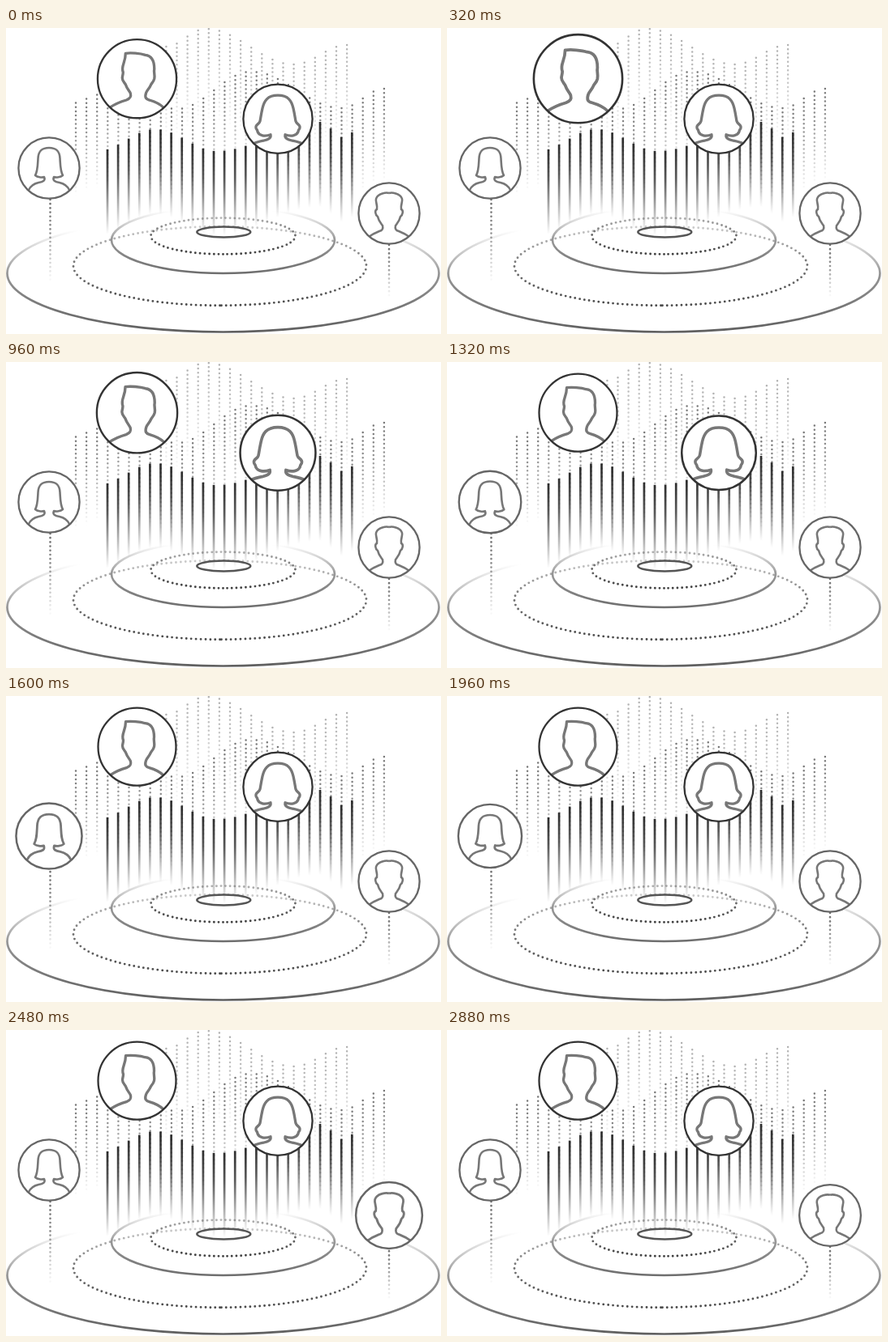
These frames come from a looping animation (536 px wide and 378 px high, 2920 ms). An HTML page with a canvas:

```html
<!DOCTYPE html>
<html lang="en">
<head>
<meta charset="utf-8">
<title>Audience stage</title>
<style>
html, body { margin: 0; width: 536px; height: 378px; overflow: hidden; background: #fff; }
canvas { display: block; }
</style>
</head>
<body>
<canvas id="stage" width="536" height="378"></canvas>
<script>
const LOOP = 2920, STEP = 13.1, DOTS = [0, 5.2];
const ctx = document.getElementById('stage').getContext('2d');

// Crests and troughs [column, y]; the columns between follow a cosine
const rows = [
  { x: 197.4, count: 18, length: 115, grey: 178, width: 2.5, dash: DOTS,
    turns: [[0, 23], [3.7, 1], [12, 45], [17, 21]] },
  { x: 86, count: 30, length: 115, grey: 120, width: 2.5, dash: DOTS,
    turns: [[-2.5, 99], [4.5, 76], [9.5, 100], [16.5, 54], [25, 99], [29, 75]] },
  { x: 125, count: 24, length: 105, grey: 45, width: 2.7,
    turns: [[-1, 152], [4.5, 125], [10.3, 152], [20, 116], [22.2, 135], [24, 120]] }
];

// Each pulse grows from start to peak and shrinks back until end
const large = { ring: '#333', ringWidth: 2.3, width: 3.3, grow: .2 };
const small = { ring: '#666', ringWidth: 2.3, width: 2.6, grow: .1 };
const people = [
  { ...large, x: 161.5, y: 62.7, r: 48, start: -30, peak: 480, end: 1060,
    path: 'M-33 35C-27 31-20 28-13 26C-8 24-7 22-8 18C-9 15-12 13-14 7C-15 5-18 3-18-1C-18-3-17-5-17-8C-20-16-14-19-14-31C-8-32 4-31 10-29C19-28 21-20 21-12C20-8 22-5 21 0C20 4 18 5 17 7C15 12 12 14 11 17C9 23 11 25 15 26C22 28 28 31 32 35' },
  { ...large, x: 335, y: 112.2, r: 42.6, mirror: true, start: 822, peak: 1130, end: 1434,
    path: 'M0-29C-13-29-17-22-19-13C-21-4-21-2-22 3C-23 7-28 7-27 11C-27 13-25 13-25 16C-23 21-16 22-9 19.5C-8 25-14 26-18 27C-23 28-27 29-31 31' },
  { ...small, x: 53, y: 173, r: 37.6, mirror: true, start: 1237, peak: 1700, end: 2133,
    path: 'M0-25C-9-25-13-21-13.5-12C-14-2-14 4-17 9C-14 11.5-9 12-6 11C-4 16-8 17-13 18C-20 19.5-23 23-25 27' },
  { ...small, x: 472, y: 229, r: 37.6, mirror: true, start: 1960, peak: 2420, end: 2920,
    path: 'M0-25C-3-26-14-25-16-18C-17-14-14-11-15-5C-18-4-17 2-14 4C-13 9-11 11-8 15C-7 19-8 21-12 22C-17 24-21 26-25 29' }
];
for (const p of people) p.shape = new Path2D(p.path);

function wave(turns, i) {
  const next = turns.findIndex(([at]) => at >= i) || 1;
  const [x0, y0] = turns[next - 1], [x1, y1] = turns[next];
  return y0 + (y1 - y0) * (1 - Math.cos(Math.PI * (i - x0) / (x1 - x0))) / 2;
}

function pen(style, width, dash = []) {
  ctx.strokeStyle = style;
  ctx.lineWidth = width;
  ctx.setLineDash(dash);
  ctx.lineCap = dash.length ? 'round' : 'butt';
}

function gradient(y0, y1, grey, stops) {
  const g = ctx.createLinearGradient(0, y0, 0, y1);
  for (const [at, alpha] of stops) g.addColorStop(at, `rgba(${grey},${grey},${grey},${alpha})`);
  return g;
}

function column(x, top, { length, grey, width, dash }) {
  pen(gradient(top, top + length, grey, [[0, 1], [.35, .78], [1, 0]]), width, dash);
  ctx.beginPath();
  ctx.moveTo(x, top);
  ctx.lineTo(x, top + length);
  ctx.stroke();
}

// Starts at the bottom, so the seam of a dotted ring lies there
function ring(x, y, rx, ry, style, width, dash) {
  pen(style, width, dash);
  ctx.beginPath();
  ctx.ellipse(x, y, rx, ry, 0, Math.PI / 2, Math.PI * 2.5);
  ctx.stroke();
}

function backdrop() {
  for (const row of rows)
    for (let i = 0; i < row.count; i++) column(row.x + STEP * i, wave(row.turns, i), row);

  ring(267.5, 303, 266, 72.5, gradient(250, 376, 95, [[0, 0], [.42, .65], [1, 1]]), 2.7);
  ring(263.5, 294, 180.5, 48.8, gradient(245, 343, 75, [[0, .28], [.45, .75], [1, 1]]), 2.9, [0, 5.9]);
  ring(267.5, 262, 137.5, 41, gradient(226, 303, 110, [[0, 0], [.45, .7], [1, 1]]), 2.6);
  ring(267.5, 257, 89, 22.4, gradient(234, 280, 65, [[0, .4], [.5, .8], [1, 1]]), 2.9, [0, 5.7]);
  ring(268.3, 252, 33, 6.5, '#555', 2.6);

  const stem = { grey: 110, width: 2.7, dash: DOTS };
  column(54.5, 212, { ...stem, length: 103 });
  column(472, 268, { ...stem, length: 65 });
}

function pulse({ start, peak, end }, t) {
  const up = (t - start) / (peak - start), down = (end - t) / (end - peak);
  return Math.max(0, Math.min(up, down));
}

function portrait(p, t) {
  const scale = 1 + p.grow * pulse(p, t);
  ctx.save();
  ctx.translate(p.x, p.y);
  ctx.scale(scale, scale);
  ctx.beginPath();
  ctx.arc(0, 0, p.r, 0, Math.PI * 2);
  ctx.fillStyle = '#fff';
  ctx.fill();
  ctx.save();
  ctx.clip();
  pen('#777', p.width);
  ctx.lineJoin = 'round';
  ctx.stroke(p.shape);
  if (p.mirror) {
    ctx.scale(-1, 1);
    ctx.stroke(p.shape);
  }
  ctx.restore();
  ring(0, 0, p.r, p.r, p.ring, p.ringWidth);
  ctx.restore();
}

const origin = performance.now();
function draw() {
  const t = (performance.now() - origin) % LOOP;
  ctx.fillStyle = '#fff';
  ctx.fillRect(0, 0, 536, 378);
  backdrop();
  for (const p of people) portrait(p, t);
  requestAnimationFrame(draw);
}
draw();
</script>
</body>
</html>
```
